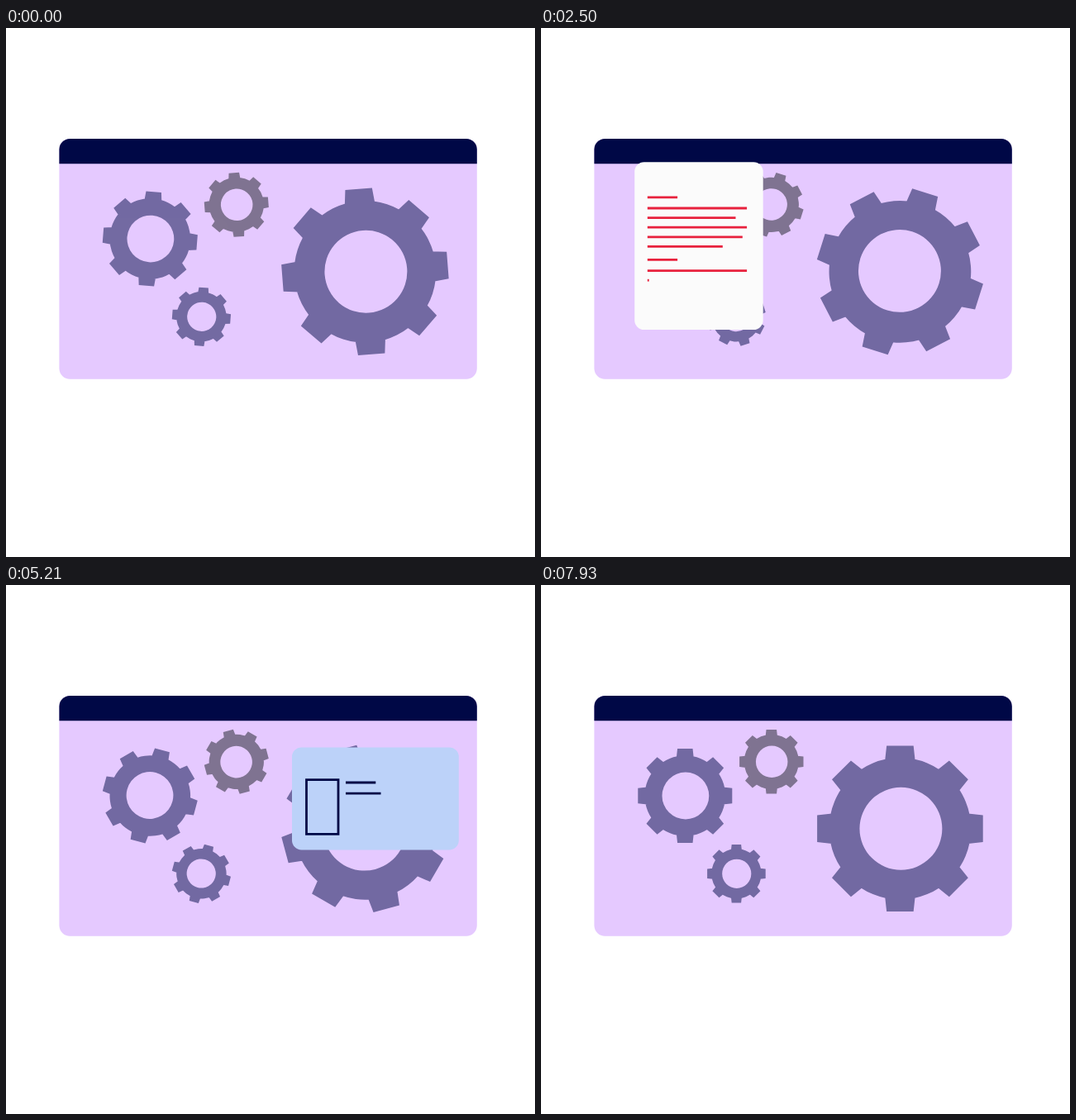
Animation, 640 px wide and 640 px high, one loop 8000 ms. Source, as an HTML page:

```html
<!DOCTYPE html>
<html lang="en">
<head>
<meta charset="utf-8">
<title>Gears and pages</title>
<style>
  html, body { margin: 0; width: 100%; height: 100%; overflow: hidden; background: #fff; }
  svg { display: block; width: 100%; height: 100%; }
</style>
</head>
<body>
<svg id="stage" viewBox="0 0 640 640"></svg>
<script>
const LOOP = 8000, LINE_TIME = 283, RISE = 0.0271;
const NAVY = '#000846', PURPLE = '#7269a2';
const stage = document.getElementById('stage');
const clamp = v => Math.max(0, Math.min(1, v));

function add(parent, tag, attrs) {
  const el = document.createElementNS('http://www.w3.org/2000/svg', tag);
  for (const key in attrs) el.setAttribute(key, attrs[key]);
  return parent.appendChild(el);
}

// Circle around (cx, 0); sweep 1 fills, sweep 0 cuts a hole
const circle = (r, cx, sweep) =>
  `M${cx - r} 0a${r} ${r} 0 0 ${sweep} ${2 * r} 0a${r} ${r} 0 0 ${sweep} ${-2 * r} 0Z`;

// Gear of outer radius 100 with eight tapered teeth and a hole slightly off centre
function gearPath() {
  let d = circle(85.6, 0, 1);
  for (let i = 0; i < 8; i++) {
    const point = (r, side) => {
      const a = i * Math.PI / 4;
      return [r * Math.cos(a) - side * Math.sin(a), r * Math.sin(a) + side * Math.cos(a)];
    };
    d += `M${point(80, -18.4)}L${point(100, -16.2)}L${point(100, 16.2)}L${point(80, 18.4)}Z`;
  }
  return d + circle(49.8, 1, 0);
}

function gear(x, y, radius, dir, fill) {
  const el = add(stage, 'path', { d: gearPath(), fill });
  return angle => el.setAttribute('transform',
    `translate(${x} ${y}) rotate(${dir * angle}) scale(${radius / 100})`);
}

// A sheet that fades in, rises and fades out; its strokes are drawn one after another
function sheet(start, top, box, fill, stroke) {
  const el = add(stage, 'g', { fill: 'none', stroke, 'stroke-width': 2.8 });
  add(el, 'rect', { ...box, rx: 11.5, fill, stroke: 'none' });
  const strokes = [];

  function trace(d, from, time) {
    strokes.push({ from, time, path: add(el, 'path', { d, pathLength: 1 }) });
  }
  // A short heading, then lines of the given widths
  function paragraph(x, y, from, widths) {
    trace(`M${x} ${y}h36.3`, from, LINE_TIME);
    widths.forEach((w, i) =>
      trace(`M${x} ${y + 13.2 + i * 11.6}h${w}`, from + (i + 1) * LINE_TIME, LINE_TIME));
  }
  function draw(t) {
    const u = t - start;
    el.setAttribute('opacity', Math.min(clamp(u / 175), clamp((3750 - u) / 200)));
    el.setAttribute('transform', `translate(0 ${top - RISE * u})`);
    for (const { from, time, path } of strokes) {
      const p = clamp((u - from) / time);
      path.setAttribute('visibility', p > 0 ? 'inherit' : 'hidden');
      path.setAttribute('stroke-dasharray', p < 1 ? `${p} 2` : 'none');
    }
  }
  return { trace, paragraph, draw };
}

// Window with a title bar
add(stage, 'rect', { x: 64.4, y: 133.9, width: 505.4, height: 290.8, rx: 13, fill: '#e5c9ff' });
add(stage, 'path', { d: 'M64.4 164.2V146.9a13 13 0 0 1 13-13H556.8a13 13 0 0 1 13 13V164.2Z', fill: NAVY });

const gears = [
  gear(434.4, 294.8, 100.3, -1, PURPLE),
  gear(174.3, 255, 57, 1, PURPLE),
  gear(236.4, 349.3, 35.3, 1, PURPLE),
  gear(278.8, 213.8, 38.7, -1, '#7f7391')
];

const body = [120.3, 106.7, 120.3, 115, 91];
const page = sheet(0, 230.1, { x: 113.2, width: 155.5, height: 202.8 }, '#fbfbfb', '#e8213d');
for (let i = 0; i < 2; i++)
  page.paragraph(128.8, 42.5 + i * 75.6, 232 + i * 6 * LINE_TIME, body);

const card = sheet(LOOP / 2, 229.2, { x: 346, width: 201.8, height: 124 }, '#bcd2f9', NAVY);
card.trace('M402 39.2V105H363.5V39.2Z', -130, 970);
card.paragraph(411, 42.6, 828, [...body.slice(0, 2), 83.3]);

function draw(t) {
  const angle = Math.min(360, 4.4 + 0.0452 * t);
  gears.forEach(turn => turn(angle));
  page.draw(t);
  card.draw(t);
}

const begin = performance.now();
function tick() {
  draw((performance.now() - begin) % LOOP);
  requestAnimationFrame(tick);
}
tick();
</script>
</body>
</html>
```
